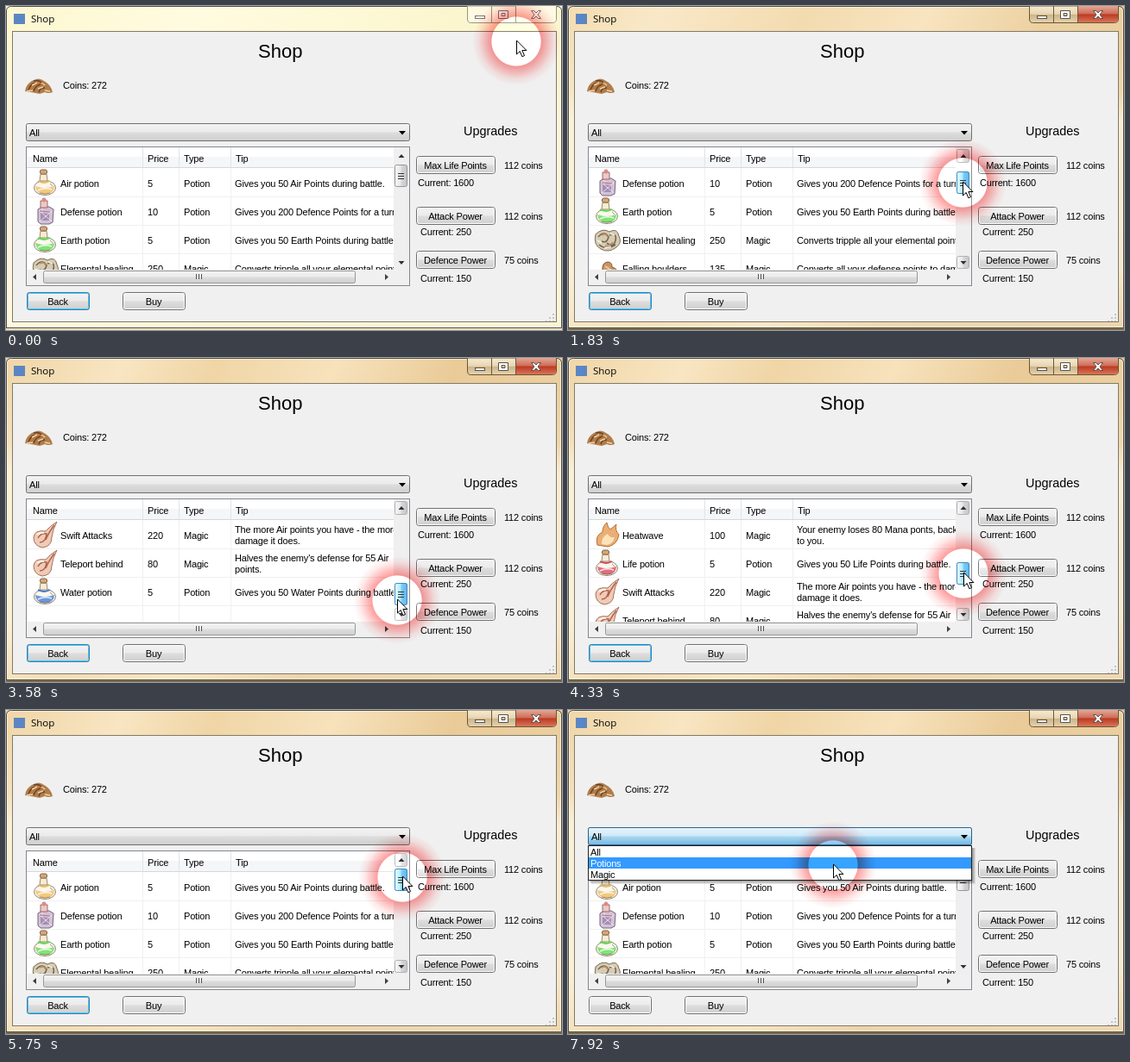
An HTML page that plays this animation: 644 by 376 pixels, repeating every 8000 ms.

```html
<!DOCTYPE html>
<html lang="en">
<head>
<meta charset="utf-8">
<title>Shop</title>
<style>
html, body { margin: 0; width: 100%; height: 100%; overflow: hidden; background: #f0f0f0; }
svg { display: block; width: 644px; height: 376px; }
text { font: 11px "Liberation Sans", Arial, sans-serif; letter-spacing: -.18px; white-space: pre; }
.head { font-size: 22px; letter-spacing: 0; }
.sub { font-size: 14.4px; letter-spacing: 0; }
.caption { font: 11.5px "Open Sans", "Noto Sans", sans-serif; letter-spacing: 0; }
#disc { mix-blend-mode: color-dodge; }
#glow { mix-blend-mode: multiply; }
</style>
</head>
<body>
<svg id="stage" viewBox="0 0 644 376"></svg>
<script>
const LOOP = 8000, STEP = 1000 / 12;
const ROW = 33, TOP = 189, THUMB_TOP = 184, THUMB_RANGE = 77, LAST_TOP = 8;
const GRAB = 12, OPEN_AT = 7240;

// time, x, y
const PATH = [
  [0, 591, 40], [80, 591, 40], [250, 578, 54], [450, 532, 94], [650, 483, 140], [830, 459, 165],
  [1000, 457, 174], [1170, 457, 185], [1420, 457, 196], [1670, 457, 201], [1830, 457, 204],
  [2160, 458, 226], [2500, 457, 254], [2920, 455, 271], [3330, 453, 280], [3580, 453, 280],
  [3750, 455, 274], [3920, 457, 262], [4080, 457, 262], [4500, 458, 241], [4830, 458, 228],
  [4920, 458, 227], [5330, 459, 209], [5670, 459, 196], [5920, 460, 188], [6160, 454, 182],
  [6500, 386, 171], [6670, 322, 156], [6920, 318, 152], [7330, 318, 155], [7500, 315, 168],
  [7670, 310, 183], [7750, 308, 188], [7920, 307, 179], [8000, 307, 179]
];
const COMBO_HOT = [[0, 0], [660, 0], [760, .9], [900, .9], [1000, .65], [1250, 0], [6670, 0], [6850, .8], [7200, .8], [7250, 1], [8000, 1]];
const THUMB_HOT = [[0, 0], [1160, 0], [1340, .7], [1420, 1], [6000, 1], [6330, .4], [6670, .3], [6900, 0], [8000, 0]];
const UP_HOT = [[0, 0], [830, 0], [920, 1], [1080, 1], [1330, 0], [8000, 0]];

const ITEMS = [
  ["Air potion", 5, "Potion", ["Gives you 50 Air Points during battle."], flask("#efb95c")],
  ["Defense potion", 10, "Potion", ["Gives you 200 Defence Points for a turn."], jar()],
  ["Earth potion", 5, "Potion", ["Gives you 50 Earth Points during battle."], flask("#58dc50")],
  ["Elemental healing", 250, "Magic", ["Converts tripple all your elemental points to life."], swirl()],
  ["Falling boulders", 135, "Magic", ["Converts all your defense points to damage."], rocks()],
  ["Fire potion", 5, "Potion", ["Gives you 50 Fire Points during battle."], flask("#d4501f")],
  ["Heatwave", 100, "Magic", ["Your enemy loses 80 Mana ponts, back", "to you."], flame()],
  ["Life potion", 5, "Potion", ["Gives you 50 Life Points during battle."], flask("#d8405c")],
  ["Swift Attacks", 220, "Magic", ["The more Air points you have - the more", "damage it does."], hand()],
  ["Teleport behind", 80, "Magic", ["Halves the enemy's defense for 55 Air", "points."], hand()],
  ["Water potion", 5, "Potion", ["Gives you 50 Water Points during battle."], flask("#3f74d8")]
];

// Item pictures, drawn in a 30 x 32 box
function flask(color) {
  return `<ellipse cx="14" cy="22" rx="12.500" ry="8.500" fill="#faf7ec" stroke="#8f8674"/>
    <path d="M3 20q11 4 22 0q0 9-11 9.500q-10.500-.5-11-9.500z" fill="${color}" opacity=".75"/>
    <path d="M9 6h7l1 8H8z" fill="#f6ecd6" stroke="#9c8a66"/>
    <rect x="8.500" y="1" width="8" height="5" rx="2" fill="#d2a87c" stroke="#84603c"/>
    <path d="M6 14q7 4 14 0" fill="none" stroke="${color}" stroke-width="2"/>
    <path d="M6 25q8-4 16-1M9 20l4 1" fill="none" stroke="#fff" stroke-width="1.500" opacity=".8"/>
    <path d="M8 28q6 2 12 0M20 17l3 3" fill="none" stroke="#6d5d3d" opacity=".6"/>`;
}
function jar() {
  return `<path d="M6 14l5-3h8l5 3-1 15-4 2H9l-3-3z" fill="#d3c2d6" stroke="#75627d"/>
    <path d="M9 4h8v8H9z" fill="#ecc9c6" stroke="#96696e"/><circle cx="13" cy="3" r="2.500" fill="#d88c86"/>
    <path d="M9 18l10 1v8H9z" fill="#a48fb4"/><path d="M7 15l15 13M22 16L8 28M11 13v5" stroke="#fbeef4" opacity=".8"/>
    <path d="M8 16l12 1" stroke="#c06c78"/>`;
}
function swirl() {
  return `<path d="M1 10q8-8 16-3q9-5 11 5q4 8-3 13q-9 7-18 2q-9-5-6-17z" fill="#d6ccb6" stroke="#7c6c54"/>
    <path d="M4 13q7-8 12 0q-2 8-8 5m9-7q9-3 7 6t-10 3M5 22q8 7 19 0" fill="none" stroke="#75664f" stroke-width="1.600"/>
    <path d="M8 11q5-3 7 2M12 23q6 0 9-4" fill="none" stroke="#c08d60" stroke-width="1.600"/>
    <path d="M3 17l5 3M18 9l5 2M11 26l8-1" stroke="#f7f2e6" stroke-width="1.500"/>`;
}
function rocks() {
  return `<path d="M1 27q2-7 8-8q-1-9 6-10q5 0 5 6q8 2 9 12q-13 4-28 0z" fill="#c89467" stroke="#83552f"/>
    <path d="M5 24l6-3 5 4 8-4M12 14l5 3M9 19l10-1" fill="none" stroke="#edcba4" stroke-width="2"/>
    <path d="M4 27l7-2 6 2 8-2" fill="none" stroke="#7b4020"/>`;
}
function flame() {
  return `<path d="M3 28Q0 17 9 13q0-7 5-11q1 6 4 8l7-6q-2 7 3 12q-2 12-13 14z" fill="#ebae74" stroke="#b56d3c"/>
    <path d="M8 27q0-9 7-12q2 5 8 4q-2 8-9 9z" fill="#fae3ba"/>`;
}
function hand() {
  return `<path d="M28 1q-8 5-13 11Q2 10 1 19q0 10 10 12q11-1 11-12q1-9 6-18z" fill="#efcbb6" stroke="#a3705a"/>
    <path d="M6 20q3-6 10-5q-1 10-8 10M25 5q-7 9-10 17" fill="none" stroke="#b0614f" stroke-width="1.500"/>
    <path d="M5 16q4-3 8-2" fill="none" stroke="#fff4e6" stroke-width="2"/>`;
}

const text = (x, y, str, attrs = "") => `<text x="${x}" y="${y}" ${attrs}>${str}</text>`;
const box = (x, y, w, h, fill, attrs = "") => `<rect x="${x}" y="${y}" width="${w}" height="${h}" fill="${fill}" ${attrs}/>`;
const frame = (x, y, w, h, fill, stroke, r = 2) =>
  box(x + .5, y + .5, w - 1, h - 1, fill, `stroke="${stroke}" rx="${r}"`);
const gradient = (id, stops, dir = 'x2="0" y2="1"') => `<linearGradient id="${id}" ${dir}>` +
  stops.map(([at, color, alpha = 1]) => `<stop offset="${at}" stop-color="${color}" stop-opacity="${alpha}"/>`).join("") +
  "</linearGradient>";
const button = (x, y, w, label) => frame(x, y, w, 21, "url(#face)", "#707070", 3) +
  box(x + 1.5, y + 1.5, w - 3, 18, "none", 'stroke="#fbfbfb" rx="2"') +
  text(x + w / 2 - .5, y + 15, label, 'text-anchor="middle"');
const upgrade = (y, label, cost, current, x, dy) =>
  button(475, y, 92, label) + text(577, y + 15, cost + " coins") + text(x, y + dy, "Current: " + current);

function captionButtons(face, close, edge, glyph) {
  return `<path d="M534.500 0v15q0 4.500 4 4.500h94q5 0 5-4.500v-15z" fill="${face}" stroke="${edge}"/>
    <path d="M590.500 0v19h42q4.500 0 4.500-4v-15z" fill="${close}"/>
    <path d="M562.500 0v19M590.500 0v19" stroke="${edge}"/>
    <g fill="#fff" stroke="${glyph}">
    <rect x="543.500" y="11.500" width="11" height="3"/>
    <path fill-rule="evenodd" d="M570.500 5.500h11v9h-11zM574 8.500h4v3h-4z"/>
    <path d="M608.500 5.500h3l2.500 2.500 2.500-2.500h3l-3.500 4.500 3.500 4.500h-3l-2.500-2.500-2.500 2.500h-3l3.500-4.500z"/></g>`;
}

const backdrop = (id, paint, below) =>
  `<g id="${id}">${box(0, 0, 644, 376, `url(#${paint})`)}${box(0, 30, 644, 344, "url(#lowLight)")}${box(0, 374, 644, 2, below)}</g>`;

const defs = `<defs>
  ${gradient("pale", [[0, "#fdf7cf"], [.3, "#fffbe0"], [.7, "#fcf6cf"], [1, "#faf4d3"]], 'x2="1" y2=".4"')}
  ${gradient("tan", [[0, "#f3dcb0"], [.15, "#f9e8c8"], [.4, "#f3dbb0"], [.6, "#f8e4c0"], [.8, "#ecd0a0"], [1, "#e9cd9e"]], 'x2="1" y2=".3"')}
  ${gradient("tan2", [[0, "#f0d6a8"], [.2, "#f8e5c2"], [.35, "#f0d5a6"], [.55, "#f7e2bc"], [.75, "#eacb98"], [1, "#ebd0a2"]], 'x2="1" y2=".3"')}
  ${gradient("lowLight", [[0, "#fdf4e0", 0], [.2, "#fdf4e0", .2], [.3, "#fdf4e0", .8], [.8, "#fdf4e0", .7], [1, "#fdf4e0", .2]])}
  ${gradient("face", [[0, "#f3f3f3"], [.48, "#ebebeb"], [.52, "#dddddd"], [1, "#cfcfcf"]])}
  ${gradient("hot", [[0, "#e6f4fc"], [.48, "#cfe9f8"], [.52, "#a9d8f2"], [1, "#76b8e2"]])}
  ${gradient("bar", [[0, "#f5f5f5"], [.48, "#e9e9eb"], [.52, "#d7d7da"], [1, "#c5c5c9"]], 'x2="1" y2="0"')}
  ${gradient("barHot", [[0, "#d6effb"], [.48, "#a5dbf6"], [.52, "#74c1ea"], [1, "#5ba8d8"]], 'x2="1" y2="0"')}
  ${gradient("glass", [[0, "#f8ecd4"], [.48, "#e8d5b0"], [.52, "#ccb48a"], [1, "#e6d3ae"]])}
  ${gradient("red", [[0, "#e2a898"], [.48, "#cf6b55"], [.52, "#b93a22"], [1, "#d9745a"]])}
  <radialGradient id="halo" gradientUnits="userSpaceOnUse" cx="0" cy="0" r="51">
    <stop offset=".55" stop-color="#ff6464" stop-opacity="0"/>
    <stop offset=".57" stop-color="#ff6464" stop-opacity=".62"/>
    <stop offset=".7" stop-color="#ff6464" stop-opacity=".4"/>
    <stop offset=".85" stop-color="#ff6464" stop-opacity=".14"/>
    <stop offset="1" stop-color="#ff6464" stop-opacity="0"/></radialGradient>
  <clipPath id="listArea"><rect x="24" y="188" width="425" height="118"/></clipPath>
  <clipPath id="belowMenu"><rect x="440" y="198" width="40" height="120"/></clipPath>
</defs>`;

const windowFrame = `
  ${backdrop("paleBack", "pale", "#e9dfc0")}${backdrop("tanBack", "tan", "#7a6a4e")}${backdrop("tanBack2", "tan2", "#7a6a4e")}
  <path d="M.5 374V6q0-5.500 6-5.500h631q6 0 6 5.500v367.500h-643" fill="none" stroke="#55503f"/>
  <path d="M1.500 372V7q0-5.500 5-5.500h630q6 0 6 5.500v365.500z" fill="none" stroke="#fff" opacity=".55"/>
  ${frame(7, 29, 631, 338, "#f0f0f0", "#807a68", 0)}
  <g id="paleButtons">${captionButtons("#fdf9e2", "#fdf9e2", "#9a9580", "#77766c")}</g>
  <g id="tanButtons">${captionButtons("url(#glass)", "url(#red)", "#6a5738", "#5a5148")}</g>
  ${box(9, 9, 13, 12, "#5b86c4")}
  ${text(29, 19, "Shop", 'class="caption"')}`;

const coins = `<path d="M22 99q1-8 8-12q8-5 14 0q8 4 10 13q-5 2-9 0l-6 2q-9-2-17-3z" fill="#b07d4c"/>
  <path d="M26 97q4-9 9-7m-3 9q2-7 8-8m-2 9q1-5 7-5m-13-8q7-2 11 4" fill="none" stroke="#6f4120" stroke-width="1.500"/>
  <path d="M30 92l6-3M37 96l6-2M24 99l7-1M45 98l6 1M41 89l4 3" stroke="#f0d3a6" stroke-width="1.500"/>`;

const form = `
  ${text(292, 60, "Shop", 'class="head"')}${text(530, 150, "Upgrades", 'class="sub"')}
  ${coins}${text(66, 96, "Coins: 272")}
  ${frame(23, 136, 445, 21, "url(#face)", "#707070")}
  <g id="comboHot">${frame(23, 136, 445, 21, "url(#hot)", "#2c628b")}</g>
  ${text(27, 151, "All")}<path d="M455 145h8l-4 4.500z"/>
  ${upgrade(174, "Max Life Points", 112, 1600, 477, 35)}
  ${upgrade(233, "Attack Power", 112, 250, 480, 33)}
  ${upgrade(284, "Defence Power", 75, 150, 480, 36)}
  ${button(24, 332, 73, "Back")}${button(135, 332, 73, "Buy")}
  <g id="focus" fill="none">${box(24.5, 332.5, 72, 20, "none", 'stroke="#3c7fb1" rx="3"')}
    ${box(25.5, 333.5, 70, 18, "none", 'stroke="#48c4f0" rx="2"')}</g>
  <path d="M634 357v9M630 361v5M626 365v1" stroke="#c4c4c4" stroke-width="2" stroke-dasharray="2 2"/>`;

const list = `
  ${frame(23, 163, 445, 162, "#fff", "#828790", 0)}
  ${box(24, 175, 425, 12, "#f5f6f8")}
  ${[158, 200, 260].map(x => box(x, 164, 1, 23, "#dfe3e8") + box(x, 188, 1, 118, "#f0f0f0")).join("")}
  ${box(24, 187, 425, 1, "#d8d8d8")}
  ${[221, 254, 287].map(y => box(24, y, 425, 1, "#f0f0f0")).join("")}
  ${text(31, 181, "Name")}${text(164, 181, "Price")}${text(206, 181, "Type")}${text(266, 181, "Tip")}
  <g id="rows" clip-path="url(#listArea)"></g>
  ${box(24, 306, 443, 18, "#f0f0f0")}
  ${frame(43, 307, 362, 15, "url(#face)", "#979797")}
  <path d="M220.500 311v6M223.500 311v6M226.500 311v6" stroke="#555"/>
  <path d="M35 311v7l-4-3.500zM439 311v7l4-3.500z" fill="#404040"/>
  ${box(449, 164, 18, 142, "#efefef")}`;

const scrollbar = `<g id="vbar">
  <g id="barEnds">${frame(450, 166, 15, 16, "url(#bar)", "#b0b0b0")}${frame(450, 290, 15, 15, "url(#bar)", "#b0b0b0")}</g>
  <g id="upHot">${frame(450, 166, 15, 16, "url(#barHot)", "#3c7fb1")}</g>
  <path d="M454.500 176h7l-3.500-4zM454.500 296h7l-3.500 4z" fill="#303030"/>
  <g id="thumb">${frame(450, 0, 15, 26, "url(#bar)", "#979797")}
    <g id="thumbHot">${frame(450, 0, 15, 26, "url(#barHot)", "#3c7fb1")}</g>
    <path d="M454 10.500h7M454 13.500h7M454 16.500h7" stroke="#333"/></g></g>`;

const shadow = [1, 2, 3, 4].map(d => box(23 + d, 160, 445, 38 + d, "#000", 'opacity=".1"')).join("");
const menu = `<g id="menu">${shadow}${frame(23, 157, 445, 41, "#fff", "#222", 0)}
  ${box(24, 0, 443, 13, "#3399ff", 'id="pick"')}
  ${["All", "Potions", "Magic"].map((s, i) => text(26, 169 + 13 * i, s, 'class="option"')).join("")}</g>`;

const pointer = `<path d="M.5 0v16l3.700-3.500 2.600 6.200 2.700-1.100-2.600-6.100h5z" fill="#fff" stroke="#000"/>`;

document.getElementById("stage").innerHTML = defs + windowFrame + form + list + scrollbar + menu +
  `<circle id="disc" r="29" fill="#111"/><circle id="glow" r="51" fill="url(#halo)"/>` +
  `<g id="pointer">${pointer}</g>`;

const $ = id => document.getElementById(id);
const show = (id, on) => $(id).style.display = on ? "" : "none";
const fade = (id, value) => $(id).setAttribute("opacity", value);
const move = (id, x, y) => $(id).setAttribute("transform", `translate(${x} ${y})`);

function sample(keys, t) {
  const i = Math.max(1, keys.findIndex(k => k[0] >= t));
  const a = keys[i - 1], b = keys[i], p = (t - a[0]) / (b[0] - a[0]);
  return a.slice(1).map((v, n) => v + (b[n + 1] - v) * p);
}

function rowMarkup([name, price, kind, tip, art], i) {
  const y = TOP + i * ROW, first = tip.length > 1 ? 14 : 21;
  return `<g transform="translate(31 ${y})">${art}</g>` + text(63, y + 21, name) + text(164, y + 21, price) +
    text(206, y + 21, kind) + tip.map((line, n) => text(265, y + first + 13 * n, line)).join("");
}

let shownTop = -1;
function scrollTo(top) {
  if (top === shownTop) return;
  shownTop = top;
  $("rows").innerHTML = ITEMS.slice(top, top + 4).map(rowMarkup).join("");
}

function draw(now) {
  const t = Math.floor(((now % LOOP) + 5) / STEP) * STEP % LOOP;
  const [x, y] = sample(PATH, t).map(Math.round);
  const active = t > 1300, later = t > 2900, open = t > OPEN_AT;

  const dragging = t > 1420 && t < 6000;
  const offset = dragging ? Math.min(THUMB_RANGE, Math.max(0, y - GRAB - THUMB_TOP)) : 0;
  scrollTo(Math.round(offset / THUMB_RANGE * LAST_TOP));
  move("thumb", 0, THUMB_TOP + offset);

  show("tanBack", active && !later);
  show("tanBack2", later);
  show("paleBack", !active);
  show("paleButtons", !active);
  show("tanButtons", active);
  show("barEnds", t > 900 && t < 6700);
  show("focus", !open);
  show("menu", open);
  fade("comboHot", sample(COMBO_HOT, t)[0]);
  fade("thumbHot", sample(THUMB_HOT, t)[0]);
  fade("upHot", sample(UP_HOT, t)[0]);

  const picked = Math.min(2, Math.max(0, Math.floor((y - 158) / 13)));
  $("pick").setAttribute("y", 158 + 13 * picked);
  document.querySelectorAll(".option").forEach((o, i) => o.setAttribute("fill", i === picked ? "#fff" : "#000"));
  if (open) $("vbar").setAttribute("clip-path", "url(#belowMenu)");
  else $("vbar").removeAttribute("clip-path");

  move("disc", x, y + 1);
  move("glow", x, y + 1);
  move("pointer", x, y);
}

const start = performance.now();
function tick() {
  draw(performance.now() - start);
  requestAnimationFrame(tick);
}
tick();
</script>
</body>
</html>
```
